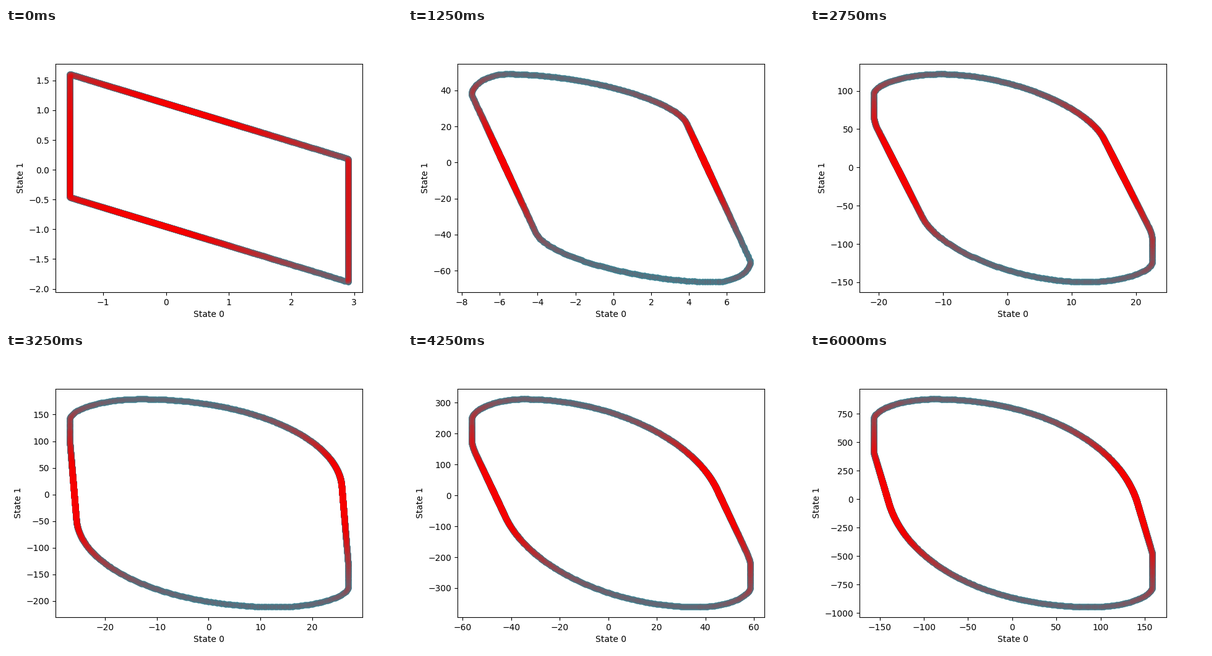
Recreate the animation shown at these times as a matplotlib script. Size 640 by 480 pixels, loop 6.25 s.

```python
import numpy as np
import matplotlib.pyplot as plt
from matplotlib.animation import FuncAnimation

FRAMES, STEP_MS, RAYS = 25, 250, 3100
GROWTH_SCALE = 15  # sizes grow linearly below this, exponentially above

# Key poses: step -> extent (xmin, xmax, ymin, ymax) in state units, then
# the top point and both ends of the straight edge in the unit box
POSES = {
    0: ((-1.539, 2.908, -1.884, 1.609), (-1, 1, 0.184, 1, -1)),
    5: ((-7.49, 7.245, -66.3, 49.1), (-0.745, 0.541, 0.526, 0.989, -0.771)),
    8: ((-13.46, 16.88, -88.9, 68.2), (-0.568, 0.2, 0.699, 0.945, -0.462)),
    13: ((-26.88, 27.05, -211.1, 179.1), (-0.488, 0.951, 0.163, 0.991, -0.48)),
    17: ((-56.4, 58.6, -361.1, 312.2), (-0.625, 0.758, 0.133, 0.967, -0.462)),
    21: ((-97.3, 99.8, -615.5, 566.8), (-0.479, 0.914, 0.044, 0.989, -0.373)),
    24: ((-157.1, 158.8, -947.5, 881), (-0.568, 0.891, 0, 0.967, -0.343)),
}
EXTENTS, SHAPES = (np.array(part) for part in zip(*POSES.values()))


def between(step, rows):
    """Interpolate every column of the key poses at a step."""
    return np.array([np.interp(step, list(POSES), col) for col in rows.T])


def extent(step):
    return GROWTH_SCALE * np.sinh(
        between(step, np.arcsinh(EXTENTS / GROWTH_SCALE)))


def conic(p0, p1, p2, w, n=300):
    """Rational quadratic curve; w = 0 gives a straight line."""
    s = np.linspace(0, 1, n)[:, None]
    b0, b1, b2 = (1 - s) ** 2, 2 * w * s * (1 - s), s ** 2
    pts = b0 * np.array(p0) + b1 * np.array(p1) + b2 * np.array(p2)
    return pts / (b0 + b1 + b2)


def outline(step):
    """Centrally symmetric outline in the unit box."""
    top_u, cu, cv, du, dv = between(step, SHAPES)
    rounding = min(1, step / 4)
    side = 1 - 0.2 * rounding
    side_end = max(dv - 0.15 * rounding, -side)
    slope = (dv - cv) / (du - cu + 1e-9)
    top, c, d, right = (top_u, 1), (cu, cv), (du, dv), (1, side_end)
    shoulder = (cu + (1 - cv) / slope, 1)
    corner = (1, max(side_end, dv + (1 - du) * slope))
    half = np.vstack([
        conic((-1, side), (-1, 1), top, 0.65),
        conic(top, shoulder, c, rounding * (0.8 - 0.45 * cv)),
        np.linspace(c, d, 300),
        conic(d, corner, right, 0.9),
        np.linspace(right, (1, -side), 300),
    ])
    return np.vstack([half, -half])


def boundary(step, limits):
    """Boundary points hit by evenly spaced rays from the origin."""
    x0, x1, y0, y1 = limits
    u, v = outline(step).T
    x = (x0 + x1) / 2 + u * (x1 - x0) / 2
    y = (y0 + y1) / 2 + v * (y1 - y0) / 2
    angle = np.arctan2(y, x)
    rays = np.linspace(0, 2 * np.pi, RAYS, endpoint=False)
    return np.column_stack([np.interp(rays, angle, k, period=2 * np.pi)
                            for k in (x, y)])


fig, ax = plt.subplots(figsize=(6.4, 4.8), dpi=100)
ax.set_xlabel("State 0")
ax.set_ylabel("State 1")
base = ax.scatter([], [], s=56, color=(0.14, 0.58, 0.65), linewidths=0)
glow = ax.scatter([], [], s=54, color="red", alpha=0.1, linewidths=0)


def update(step):
    limits = extent(step)
    pts = boundary(step, limits)
    base.set_offsets(pts)
    glow.set_offsets(pts)
    x0, x1, y0, y1 = limits
    mx, my = 0.05 * (x1 - x0), 0.05 * (y1 - y0)
    ax.set_xlim(x0 - mx, x1 + mx)
    ax.set_ylim(y0 - my, y1 + my)
    return base, glow


anim = FuncAnimation(fig, update, frames=FRAMES, interval=STEP_MS,
                     repeat=True, repeat_delay=0)
plt.show()
```
